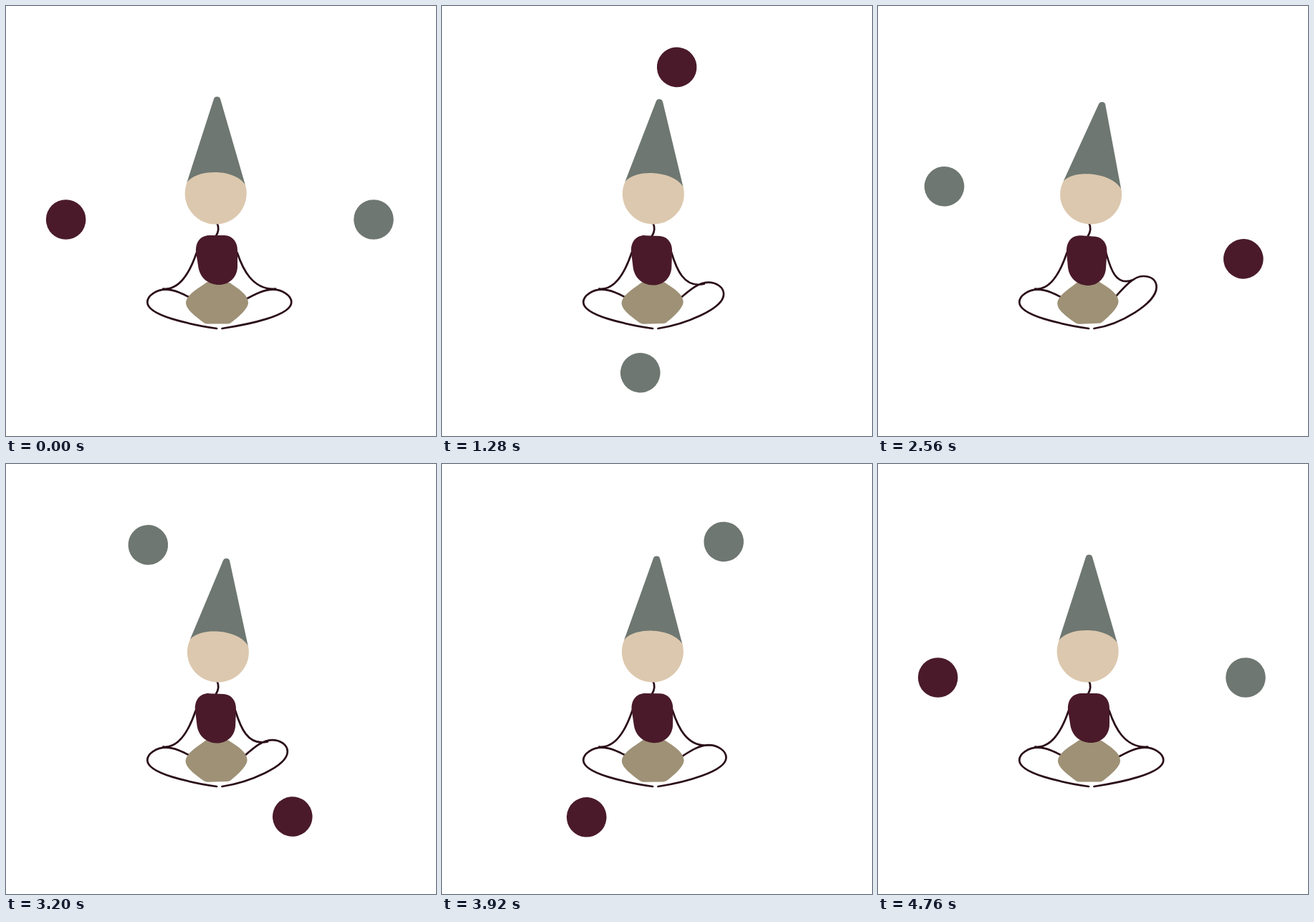
Write an HTML page that moves like this. It is 600 by 600 pixels and loops after 4.8 s.

```html
<!DOCTYPE html>
<html lang="en">
<head>
<meta charset="utf-8">
<title>Juggling meditation</title>
<style>
  html, body { margin: 0; width: 100%; height: 100%; overflow: hidden; background: #fff; }
  svg { display: block; width: 100%; height: 100%; }
  .line { fill: none; stroke: #2a0d17; stroke-width: 2.7; stroke-linecap: round; stroke-linejoin: round; }
</style>
</head>
<body>
<svg viewBox="0 0 600 600">
  <g id="balls">
    <circle cx="83.6" cy="298" r="27.8" fill="#4a1a2a"/>
    <circle cx="513" cy="298" r="27.8" fill="#6e7771"/>
  </g>
  <path class="line" id="leftLimbs"/>
  <path class="line" id="rightLimbs"/>
  <path class="line" d="M294.5 303C297.5 309 297.2 314 293 321"/>
  <path id="hips" fill="#9e9176" d="M281 385L312 386C322 393 338 402 338 414C338 423 322 436 313.5 442.3Q311 443.7 308 443.6L281 443.6Q278 443.5 275 441.3C266 434 251 424 251 414C251 403 270 393 281 385Z"/>
  <path id="torso" fill="#4a1a2a" d="M284 320L305 320C316 320.5 323 329 323 341L323 363C323 379 311 389 297 389C283 389 271 380 268.5 365L265 343C264 329 272 320 284 320Z"/>
  <g id="head">
    <path fill="#6e7771" d="M252.5 246L289.7 130.5C290.7 127.4 292 126.6 294.5 126.6C297 126.6 298.4 127.4 299.3 130.5L333.8 249.5L293 262Z"/>
    <path fill="#dcc8ae" d="M252.8 245.5C262 235 278 232 291.5 232C306 232 324 236 333.8 249A43 43 0 1 1 252.8 245.5Z"/>
  </g>
</svg>
<script>
const LOOP = 4800, STEP = 40, TURN = 4760;
const MID = 297.75; // mirror axis of the legs
const el = id => document.getElementById(id);

const part = (t, a, b) => Math.min(1, Math.max(0, (t - a) / (b - a)));
const smooth = x => x * x * (3 - 2 * x);

// Cubic ease with flat ends; x1 and x2 set the length of its handles
function ease(x, x1, x2) {
  let lo = 0, hi = 1;
  for (let i = 0; i < 24; i++) {
    const m = (lo + hi) / 2, n = 1 - m;
    if (3 * n * n * m * x1 + 3 * n * m * m * x2 + m * m * m < x) lo = m; else hi = m;
  }
  return smooth(lo);
}

// Turn a part about a pivot, then squash it towards that pivot
function pose(id, deg, x, y, sx = 1, sy = 1) {
  el(id).setAttribute('transform',
    `translate(${x} ${y}) scale(${sx} ${sy}) rotate(${deg}) translate(${-x} ${-y})`);
}

// One leg and arm; side is -1 or 1, lift raises the knee, x is measured outwards
function limbs(id, side, lift, shoulderX) {
  const p = (x, y) => `${(MID + side * x).toFixed(2)} ${y.toFixed(2)} `;
  const knee = 100.5 - 10.9 * lift, kneeY = 413.2 - 23.6 * lift;
  const top = 75 - 3.3 * lift, topY = 395.6 - 21 * lift;
  const hip = 37 - 4 * lift, hipY = 409 - 3.5 * lift;
  const leg = 'M' + p(3.7, 450) +
    'C' + p(40, 444.5) + p(knee, kneeY + 19 + 4 * lift) + p(knee, kneeY) +
    'C' + p(knee, kneeY - 9.5) + p(top + 12, topY) + p(top, topY) +
    'C' + p(top - 13, topY) + p(hip + 13, hipY - 7 - 8.5 * lift) + p(hip, hipY);

  const arm = side * (shoulderX - MID);
  return el(id).setAttribute('d', leg + 'M' + p(arm, 344) +
    'C' + p(arm + 7.3 - 1.4 * lift, 365.5) + p(arm + 21 - 8.5 * lift, 397 - 5 * lift) +
    p(78.5 - 22 * lift, 394.6 - 14.5 * lift));
}

function draw(t) {
  const rise = smooth(part(t, 345, 2280));
  const nod = t < 2300 ? rise : 1 - smooth(part(t, 2320, 4740));
  const lean = t < 2280 ? rise : 1 - ease(part(t, 2280, 4760), 0.12, 0.54);
  pose('balls', 360 * t / TURN, 300, 300);
  pose('head', 6.15 * nod, 295, 304, 1, 1 - 0.038 * nod);
  pose('torso', 4.3 * lean, 280, 305, 1 - 0.03 * lean);
  pose('hips', -2.6 * lean, 285, 450, 1 - 0.022 * lean);
  limbs('leftLimbs', -1, 0, 266 - 2.6 * lean);
  limbs('rightLimbs', 1, lean, 322.5 - 5 * lean);
}

const start = performance.now();
function tick() {
  const t = (performance.now() - start) % LOOP;
  draw(Math.floor(t / STEP) * STEP);
  requestAnimationFrame(tick);
}
draw(0);
requestAnimationFrame(tick);
</script>
</body>
</html>
```
